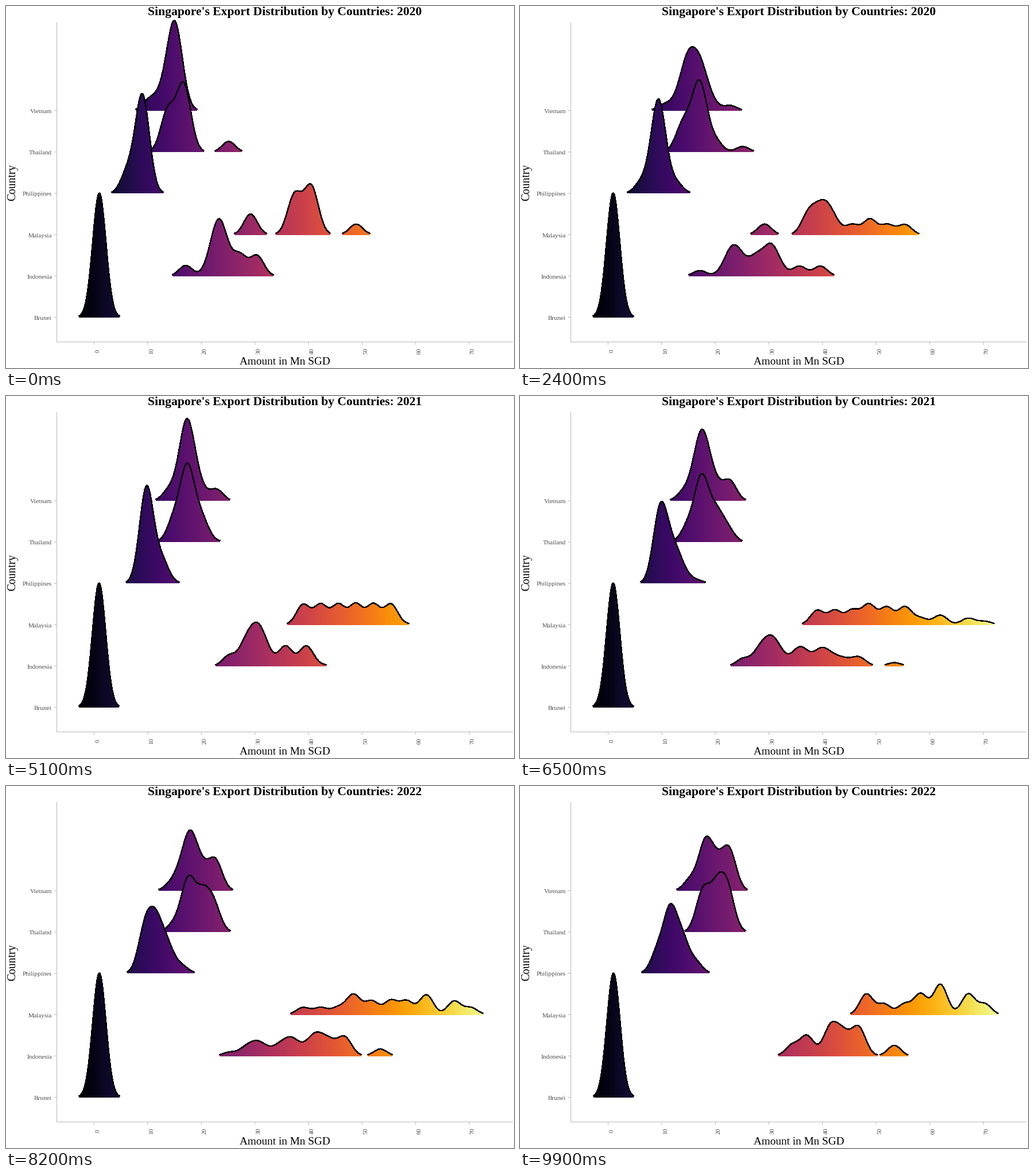
Animation of 885x632 px, one loop 10000 ms. Source, as a matplotlib script:

```python
import numpy as np
import matplotlib.pyplot as plt
from matplotlib.animation import FuncAnimation
from matplotlib.collections import LineCollection

W, H, DPI = 885, 632, 64
PX = 72 / DPI                 # points per pixel
FRAMES = 100
X0, XSTEP = 153.5, 9.336      # pixel of zero, pixels per unit
BASE, ROW = 543.4, 72.14      # lowest baseline, row spacing
BW, MASS = 1.22, 22.45        # kernel width, area of one month
CUTOFF = 0.01 * 3 * ROW       # ridges are hidden below this height
AXIS, LABEL = "#bebebe", "#4d4d4d"

plt.rcParams["font.family"] = "Liberation Serif"
fig = plt.figure(figsize=(W / DPI, H / DPI), dpi=DPI, facecolor="white")
ax = fig.add_axes([0, 0, 1, 1])
ax.set_xlim(0, W)
ax.set_ylim(H, 0)
ax.axis("off")

cols = np.arange(120, 860) + 0.5
xs = (cols - X0) / XSTEP
colors = plt.get_cmap("inferno")((xs + 2.9) / 77.1)
ridges = []


def text(x, y, s, size, **kw):
    kw = {"ha": "center", "va": "baseline", "rotation_mode": "anchor", **kw}
    return ax.text(x, y, s, fontsize=size * PX, **kw)


def rule(x, y):
    ax.plot(x, y, color=AXIS, lw=1.1 * PX, solid_capstyle="butt", snap=False,
            zorder=1)


def density(clumps, spread):
    """Sum of bells, one per clump of months; fuller clumps are wider."""
    h = np.zeros_like(xs)
    for center, months in clumps.items():
        w = BW + spread * (months - 1)
        h += MASS * months / w * np.exp(-((xs - center) / w) ** 2 / 2)
    return h


def add_ridge(name, row, spread, *years):
    """One country; each year maps an amount to the months near it."""
    base = BASE - row * ROW
    z = 20 - 2 * row
    fill = LineCollection([], linewidths=PX, antialiaseds=False,
                          capstyle="butt", snap=False, zorder=z)
    ax.add_collection(fill, autolim=False)
    edge, = ax.plot([], [], color="black", lw=1.3 * PX, antialiased=False,
                    snap=False, zorder=z + 1)
    ridges.append((base, [density(y, spread) for y in years], fill, edge))
    rule([84, 88.5], [base, base])
    text(80, base + 4.4, name, 11.4, ha="right", color=LABEL)


add_ridge("Vietnam", 5, 0.025,
          {10.3: 1, 12.4: 1, 15: 10},
          {14: 1, 17.3: 9, 19.7: 1, 22.8: 1},
          {15.3: 1, 18.2: 5, 20.4: 2, 22.6: 4})
add_ridge("Thailand", 4, 0.02,
          {13.7: 4, 16.7: 7, 25.1: 1},
          {14.8: 2, 17.4: 8, 20.1: 2},
          {17.7: 4, 20.3: 4, 22.3: 4})
add_ridge("Philippines", 3, 0.01,
          {6.2: 2, 9: 10},
          {9.8: 10, 12.7: 2},
          {9.2: 2, 11.6: 6, 13.9: 3, 16.4: 1})
add_ridge("Malaysia", 2, 0.03,
          {29.2: 2, 37.4: 4, 40.5: 5, 48.9: 1},
          {c: 2 for c in np.linspace(39, 55.4, 6)},
          {48.2: 2, 51.5: 1, 55.3: 1, 58.3: 2, 62: 3, 67.2: 2, 70.3: 1})
add_ridge("Indonesia", 1, 0.06,
          {17.1: 1, 23.3: 7, 27.2: 2, 30.4: 2},
          {25.2: 1, 28.2: 2, 30.4: 4, 32.2: 1, 35.7: 2, 39.6: 2},
          {34.3: 1, 37.1: 2, 41.5: 3, 43.8: 2, 46.7: 3, 53.4: 1})
add_ridge("Brunei", 0, 0.002, {0.97: 12}, {0.92: 12}, {1.0: 12})

rule([88.5, 88.5], [28, 587])
rule([88, 883], [586.5, 586.5])
for v in range(0, 80, 10):
    x = X0 + v * XSTEP
    rule([x, x], [586.5, 591.5])
    text(x + 8.7, 602.5, str(v), 11.4, rotation=90, color=LABEL)

text(485.5, 626.5, "Amount in Mn SGD", 19.2)
text(16, 307.5, "Country", 19.5, rotation=90)
title = text(485.5, 16, "", 21.6, weight="bold")


def update(i):
    t = 2 * i / (FRAMES - 1)
    k = min(int(t), 1)
    f = t - k
    title.set_text("Singapore's Export Distribution by Countries: "
                   f"{2020 + int(t + 0.5)}")
    for base, years, fill, edge in ridges:
        h = (1 - f) * years[k] + f * years[k + 1]
        on = h >= CUTOFF
        x, top = cols[on], base - h[on]
        bottom = np.full_like(x, base)
        fill.set_segments(np.stack([np.column_stack([x, top]),
                                    np.column_stack([x, bottom])], axis=1))
        fill.set_color(colors[on])
        edge.set_data(cols, np.where(on, base - h, np.nan))
    return []


anim = FuncAnimation(fig, update, frames=FRAMES, interval=100, repeat=True,
                     repeat_delay=0)
plt.show()
```
